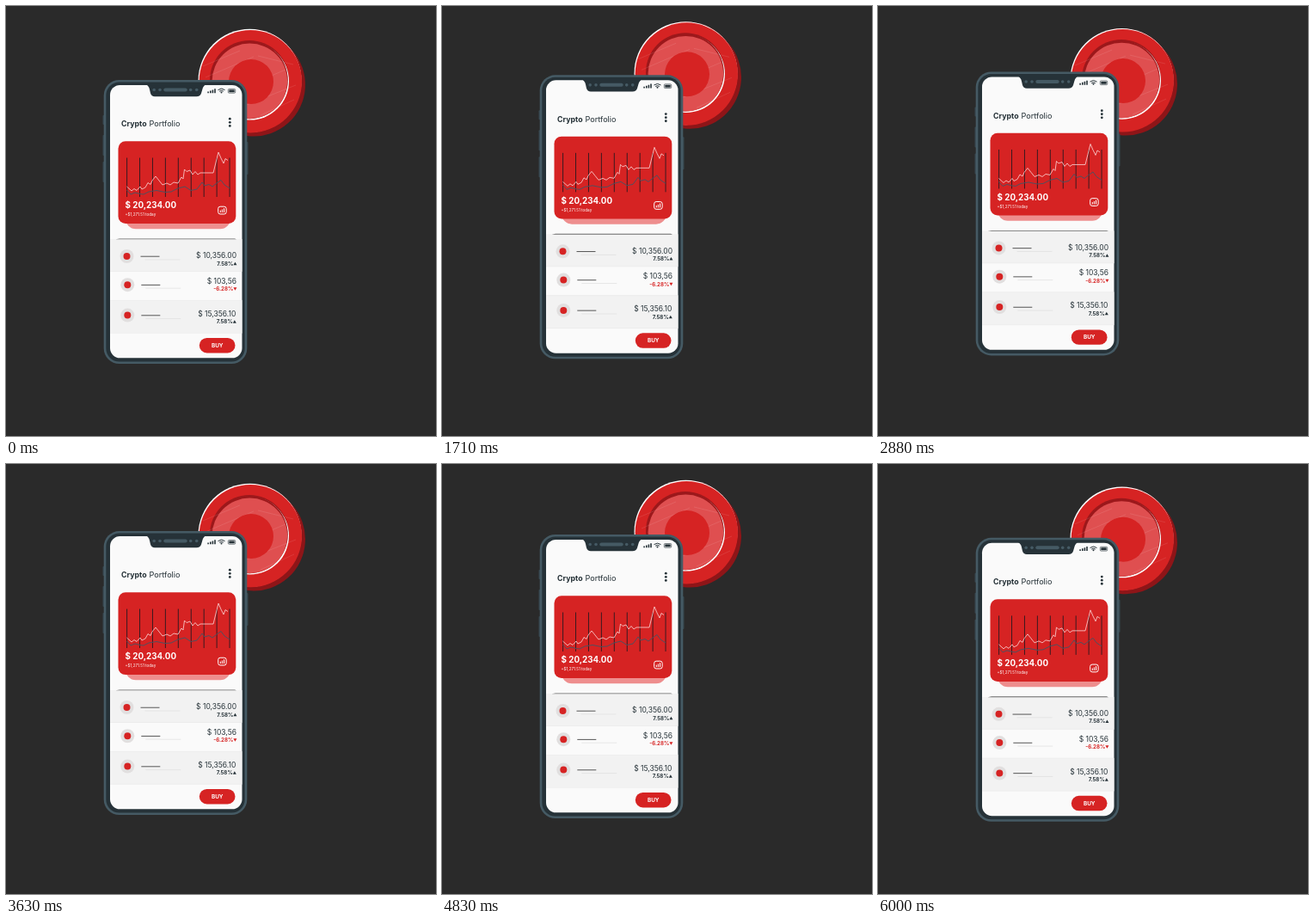
Write an HTML page that moves like this. It is 500 by 500 pixels and loops after 6.04 s.

```html
<!DOCTYPE html>
<html lang="en">
<head>
<meta charset="utf-8">
<title>Crypto Portfolio</title>
<style>
html, body { margin: 0; width: 100%; height: 100%; overflow: hidden; background: #2a2a2a; }
svg { display: block; width: 100vw; height: 100vh; }
text { font-family: Inter, "Open Sans", sans-serif; fill: #263238; }
.bold { font-weight: 700; }
.light { fill: #fff; }
.down { fill: #d62323; }
.end { text-anchor: end; }
</style>
</head>
<body>
<svg viewBox="0 0 500 500">
  <rect width="500" height="500" fill="#2a2a2a"/>

  <g id="coin">
    <path d="M284 87 L288 91.5" stroke="#8e1518" stroke-width="120" stroke-linecap="round"/>
    <circle cx="283.5" cy="86.8" r="60" fill="#fff"/>
    <circle cx="284.3" cy="87.7" r="59.7" fill="#d62323"/>
    <circle cx="283" cy="86" r="46" fill="#9c181b"/>
    <circle cx="283.8" cy="87.4" r="45.2" fill="#fff"/>
    <circle cx="282.8" cy="86.2" r="45" fill="#9c181b"/>
    <circle cx="283.4" cy="87.4" r="43.8" fill="#df4f50"/>
    <g stroke="#fff" stroke-width=".5" opacity=".2">
      <path d="M229 70 L272 52 M232 83 L288 59 M293 58 L334 68 M246 108 L325 74 M262 122 L337 92 M296 127 L335 109"/>
    </g>
    <circle cx="285" cy="88" r="26" fill="#d62323"/>
  </g>

  <g id="phone">
    <g fill="#37474f">
      <rect x="112.5" y="127" width="3" height="11" rx="1"/>
      <rect x="112.5" y="150" width="3" height="24" rx="1"/>
      <rect x="112.5" y="181" width="3" height="24" rx="1"/>
      <rect x="278.5" y="158" width="3" height="38" rx="1"/>
    </g>
    <rect x="113.7" y="86" width="166.6" height="330" rx="18" fill="#455a64"/>
    <rect x="116.3" y="88.5" width="161.4" height="325" rx="15.5" fill="#263238"/>
    <rect x="121" y="92" width="153.5" height="317.3" rx="11.5" fill="#fafafa"/>
    <path d="M162 91 Q166 92.3 167 97 L168 101.5 Q169 105.2 173 105.2 H221.5 Q226 105.2 227 101.5 L228.3 97 Q229.5 92.3 233 91Z" fill="#263238"/>
    <g fill="#455a64">
      <circle cx="172.2" cy="97.5" r="1.8"/>
      <circle cx="179" cy="97.5" r="1.8"/>
      <circle cx="214.7" cy="97.5" r="1.8"/>
      <circle cx="221.7" cy="97.5" r="1.8"/>
      <rect x="183.3" y="95.5" width="27.4" height="4" rx="2"/>
    </g>

    <g fill="#263238">
      <path d="M234.3 99.4h1.6v1.8h-1.6z M237 98.4h1.6v2.8h-1.6z M239.6 97.4h1.6v3.8h-1.6z M242.2 96.2h1.6v5h-1.6z"/>
      <circle cx="250.5" cy="100.4" r="1"/>
      <path d="M246.5 97.6 Q250.5 94.6 254.5 97.6 M248.2 99.2 Q250.5 97.4 252.8 99.2" fill="none" stroke="#263238" stroke-width="1"/>
      <rect x="258.3" y="96.5" width="8.4" height="4.7" rx="1" fill="none" stroke="#263238" stroke-width=".6"/>
      <rect x="259.3" y="97.4" width="6.4" height="2.9"/>
      <circle cx="260.3" cy="131.2" r="1.4"/>
      <circle cx="260.3" cy="135.3" r="1.4"/>
      <circle cx="260.3" cy="139.4" r="1.4"/>
    </g>
    <text class="bold" x="134" y="140.3" font-size="8.8">Crypto</text>
    <text x="166.5" y="140.3" font-size="9.1">Portfolio</text>

    <rect x="139" y="225" width="122" height="34.3" rx="12" fill="#ee8e8e"/>
    <rect x="130.5" y="157.3" width="136.8" height="95.8" rx="8.5" fill="#d62323"/>
    <path id="grid" stroke="#3a1a20" stroke-width="1"/>
    <path fill="none" stroke="#50505e" stroke-width="1" stroke-linejoin="round"
      d="M140.5 214 L145 219 150 217 156 218.5 160 219 166 216 175 214.5 185 216.5 192 216 200 212 208 210 215 214.5 222 213 228 205 231 209 236 207.5 240 210 245 206 250 202.5 254 208 260 212"/>
    <path fill="none" stroke="#fbd9d9" stroke-width=".8" stroke-linejoin="round"
      d="M140.5 210 L146 215 149 212.5 152 214.5 156 210 158 213 162 211 165 205.5 168 207.5 170 203 174 198 178 203 182 208 187 206 191 208 195 205 200 206 204 199 206 201 207.5 190 210 192.5 214 191 217 196 220 192.5 223 196 226 194 241 194 244 182 247 170 250 177 253 183 255 177.5 258 179.5"/>
    <text class="bold light" x="138.5" y="235.4" font-size="9.8">$ 20,234.00</text>
    <text class="light" x="138.5" y="244.4" font-size="4.6">+$1,271.51 today</text>
    <rect x="246.7" y="233.2" width="9.4" height="8.8" rx="2.4" fill="none" stroke="#fff"/>
    <path d="M249.3 237.6v2.5 M251.4 236.5v3.6 M253.5 235.2v4.9" stroke="#fff" stroke-width="1"/>

    <rect x="121" y="271" width="153.5" height="37.5" fill="#f2f2f2"/>
    <rect x="121" y="342.3" width="153.5" height="38" fill="#f2f2f2"/>
    <path d="M121 308.5H274.5 M121 342.3H274.5 M121 380.3H274.5" stroke="#e8e8e8" stroke-width=".6"/>
    <path d="M127.5 271.3 L132 270.5 H266 L268 271.3Z" fill="#666"/>
    <g id="rows"></g>

    <rect x="224.8" y="386" width="41.7" height="17.4" rx="8.7" fill="#d62323"/>
    <text class="bold light" x="245.7" y="397" font-size="6.4" text-anchor="middle">BUY</text>
  </g>
</svg>
<script>
const LOOP = 6040, RISE = 10;
const byId = id => document.getElementById(id);
const coin = byId("coin"), phone = byId("phone");

byId("grid").setAttribute("d",
  Array.from({ length: 9 }, (_, i) => `M${140.6 + i * 14.93} 176.5V222`).join(""));

const rows = [
  { x: 140.5, y: 291, right: 268, price: "$ 10,356.00", change: "7.58%", base: 293.4 },
  { x: 141.3, y: 324.2, right: 268, price: "$ 103,56", change: "-6.28%", base: 323, down: true },
  { x: 141.3, y: 359.6, right: 267.4, price: "$ 15,356.10", change: "7.58%", base: 361 }
];

function rowMarkup({ x, y, right, price, change, base, down }) {
  const tipY = base + (down ? 7.8 : 4.3), flatY = base + (down ? 4.3 : 7.8);
  return `
    <circle cx="${x}" cy="${y}" r="8" fill="#e1dfdf"/>
    <circle cx="${x}" cy="${y}" r="4" fill="#d62323"/>
    <path d="M${x + 16} ${y + .2}h22" stroke="#444" stroke-width=".9"/>
    <path d="M${x + 21} ${y + 4}h41" stroke="#dedede" stroke-width=".7"/>
    <text class="end" x="${right}" y="${base}" font-size="8.5">${price}</text>
    <text class="bold end ${down ? "down" : ""}" x="${right - 3.7}" y="${base + 8.2}" font-size="6.2">${change}</text>
    <path d="M${right - 3.6} ${flatY}h4l-2 ${tipY - flatY}z" fill="${down ? "#d62323" : "#263238"}"/>`;
}
byId("rows").innerHTML = rows.map(rowMarkup).join("");

// Linear rise and fall, 0 to 1 to 0 over one period.
const triangle = phase => 1 - Math.abs(1 - 2 * (phase % 1));

const lift = (part, amount) =>
  part.setAttribute("transform", `translate(0 ${(-RISE * amount).toFixed(3)})`);

function draw(now) {
  const phase = (now % LOOP) / LOOP;
  lift(phone, triangle(phase));
  lift(coin, triangle(phase * 2));
}

const start = performance.now();
function tick() {
  draw(performance.now() - start);
  requestAnimationFrame(tick);
}
tick();
</script>
</body>
</html>
```
